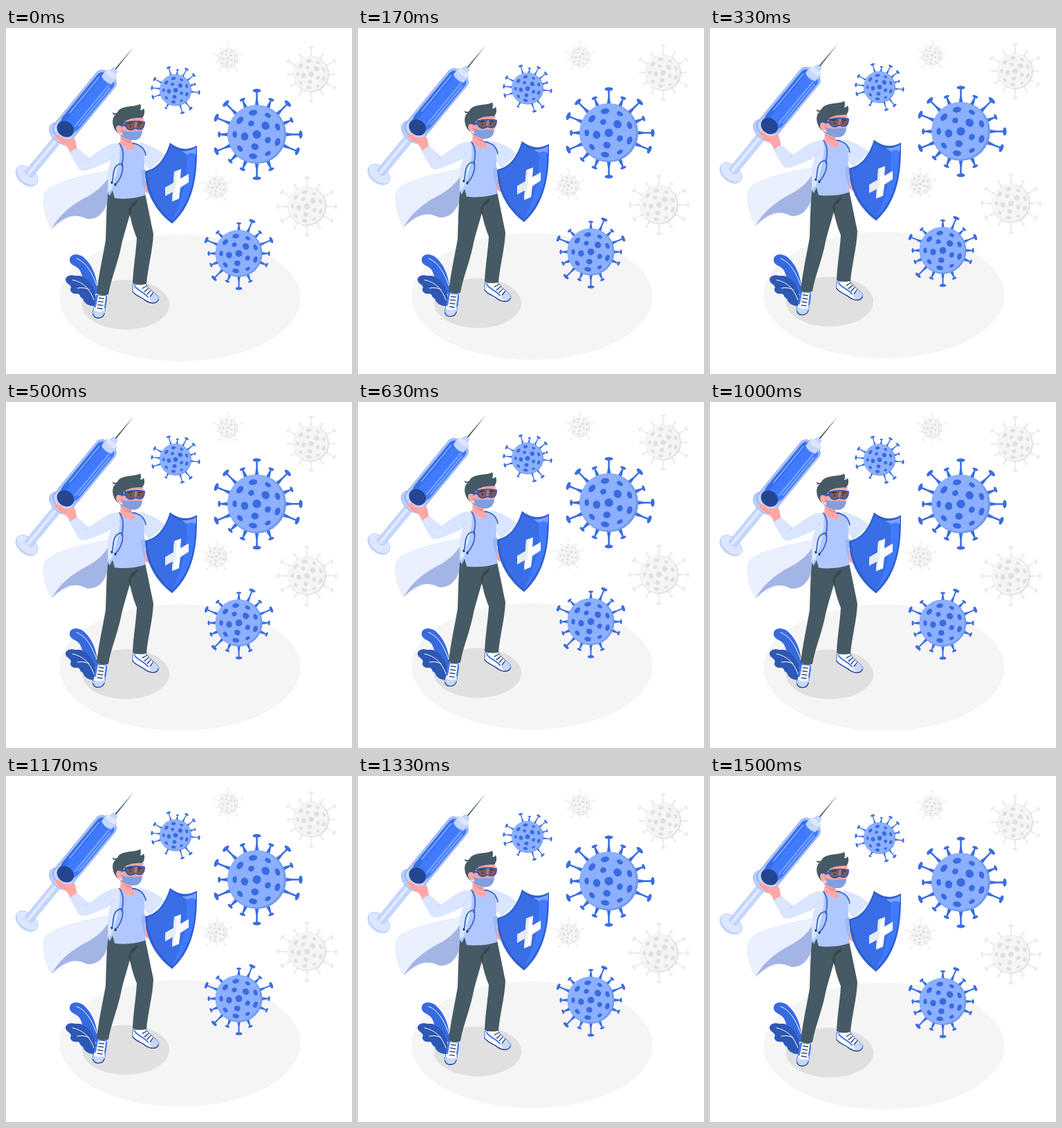
An HTML page that plays this animation: 500x500 px, repeating every 1.54 s.

```html
<!DOCTYPE html>
<html lang="en">
<head>
<meta charset="utf-8">
<title>Shielded against the virus</title>
<style>
html, body { margin: 0; width: 100%; height: 100%; overflow: hidden; background: #fff; }
svg { display: block; width: 100vw; height: 100vh; }
.line { fill: none; stroke-linecap: round; stroke-linejoin: round; }
.laces { fill: none; stroke: #324a76; stroke-width: 8; stroke-dasharray: 1.5 3.5; }
</style>
</head>
<body>
<svg viewBox="0 0 500 500">
<g class="float">
  <ellipse cx="251.5" cy="390.5" rx="174" ry="91.5" fill="#f5f5f5"/>
  <ellipse cx="173" cy="400" rx="63" ry="36" fill="#e0e0e0"/>
  <g id="viruses"></g>
</g>

<g id="leaves">
  <path fill="#376ade" d="M133 384C132 361 126 344 113 332C105 325 93 326 92 334C91 342 100 343 105 348C110 353 108 358 114 363C121 368 121 378 128 384Z"/>
  <path fill="#2d58b5" d="M130 402C131 384 126 370 115 362C110 357 104 358 100 358C94 356 86 358 86 364C87 370 94 371 94 375C91 380 96 385 102 384C108 383 106 390 111 391C113 399 121 402 130 402Z"/>
  <path class="line" stroke="#fff" d="M102 333C115 338 124 352 131 372M96 364C112 367 122 378 127 393M103 376Q112 374 120 378"/>
</g>

<g class="float">
  <g id="cape">
    <path fill="#ebf0ff" stroke="#d3dffc" stroke-width=".6" d="M148 206C120 212 82 219 62 232C54 237 53 247 55 259C57 272 61 282 66 290C82 277 98 267 117 271C135 274 146 262 150 247L162 205Z"/>
    <path fill="#a3b5e5" d="M66 290C76 272 90 260 108 249C126 240 142 230 151 210L160 214L148 247C144 264 134 278 117 276C96 266 83 274 66 290Z"/>
  </g>

  <g id="shoes">
    <path fill="#fff" stroke="#3567d6" d="M131 386L145 387C146 397 143 403 143 409C142 416 138 419 133 419C126 419 124 414 126 408C129 400 129 393 131 386Z"/>
    <path fill="#c7d8ff" d="M127 407C131 411 138 411 143 408C143 416 138 419 133 418C126 418 124 413 127 407Z"/>
    <path class="line" stroke="#29448c" stroke-width="1.3" d="M126 414C128 421 140 421 142 413"/>
    <path class="laces" d="M138 390L135.5 407"/>
    <path class="line" stroke="#3f79f7" stroke-width="2" d="M132 387L129 403M145 389L143 404"/>
    <path fill="#fff" stroke="#3567d6" d="M183 371L202 369C205 378 219 384 221 391C220 399 209 399 201 394C194 388 187 386 183 381Z"/>
    <path fill="#c7d8ff" d="M207 393C207 387 212 385 215 384C220 388 222 391 219 395C216 398 211 397 207 393Z"/>
    <path class="line" stroke="#29448c" stroke-width="1.3" d="M183 381C189 389 197 389 202 394C209 399 218 399 220 393"/>
    <path class="laces" d="M200 374Q203 380 211 386"/>
    <path class="line" stroke="#3f79f7" stroke-width="2" d="M186 373C190 380 199 381 205 389"/>
  </g>

  <g id="trousers">
    <path fill="#455a64" d="M148 235L200 234C204 254 209 278 213 298C212 322 205 346 203 370Q193 373 183 369C184 345 188 324 189 304C185 294 181 281 179 270C174 288 169 303 166 318C161 342 152 362 148 385Q140 388 131 384C134 356 140 331 144 307C145 282 145 255 148 235Z"/>
    <path fill="#37474f" d="M177 265C178 257 183 252 191 248C189 256 184 258 181 261L180 274Z"/>
  </g>

  <g id="torso">
    <path fill="#dae5ff" d="M192 165C206 168 219 175 230 184L207 206L198 193Z"/>
    <path fill="#ffa8a7" d="M198 221L208 221V240Q199 238 198 230Z"/>
    <path fill="#b1c8ff" d="M160 168L171 164L188 166L199 177C201 196 199 219 201 242Q179 249 157 246L154 235L150 243L146 237C153 216 157 190 160 168Z"/>
    <path fill="#9fb8f2" d="M201 204L195 206Q195 220 201 236Z"/>
    <path fill="#dae5ff" d="M154 168L164 166C167 190 159 215 153 233L147 238C148 220 145 208 151 193Z"/>
    <path fill="#ffa8a7" d="M166 153L181 161L182 166C187 170 187 175 184 177C176 176 168 172 165 167Z"/>
    <path fill="#f28f8f" d="M167 158Q174 164 181 163L181 167Q172 166 167 158Z"/>
    <path class="line" stroke="#3664c8" stroke-width="1.8" d="M164 167C171 176 170 190 167 199M183 167C194 168 200 174 202 184M167 196C155 197 155 211 154 221M168 196C171 208 163 222 158 226"/>
    <path class="line" stroke="#263b65" stroke-width="3" d="M153 223V224M158 226V227"/>
  </g>

  <g id="head">
    <path fill="#ffa8a7" d="M165 134L198 128C200 144 197 158 188 162C177 164 169 158 167 152C160 154 157 145 160 140Z"/>
    <path fill="#455a64" d="M163 153C157 150 152 138 155 130Q156 127 159 125Q154 127 154 122Q158 125 161 122C165 114 176 114 183 113Q191 112 194 110Q196 114 194 119Q198 119 199 116Q202 124 197 130C190 130 183 130 176 133C171 135 169 139 168 144Q165 139 160 142Q157 147 163 153Z"/>
    <path fill="#7f9fe0" d="M168 148C177 152 189 148 197 150C196 156 194 160 188 162C180 163 172 161 169 157Z"/>
    <path class="line" stroke="#5d86df" d="M166 147L169 150M170 157Q165 157 164 153"/>
    <path class="line" stroke="#2c56b5" stroke-width="2.5" d="M164 140L172 141"/>
    <path fill="#7c5c62" stroke="#2c56b5" stroke-width="1.8" d="M172 137Q185 133 200 136C200 144 197 148 190 146Q187 144 185 146C179 149 173 147 172 137Z"/>
    <path class="line" stroke="#ae7f7d" stroke-width="3" d="M188 137L187 143"/>
    <path class="line" stroke="#263238" stroke-width="1.4" d="M176 138L182 137M191 137L196 138M180 141V143M192 140V142"/>
  </g>

  <g id="syringe" transform="translate(185 27) rotate(39.4)">
    <path fill="#455a64" d="M0 0L1.1 44H-1.1Z"/>
    <ellipse cx="-1" cy="244" rx="18" ry="11.5" fill="#c5d6ff"/>
    <ellipse cx="-1" cy="242" rx="18" ry="11" fill="#dce7ff" stroke="#a9c1f7" stroke-width=".7"/>
    <path fill="#c5d6ff" stroke="#a2bbef" stroke-width=".6" d="M-7 165V239Q0 244 6 239V165Z"/>
    <path fill="#e2ebff" d="M-3 165V241H1V165Z"/>
    <ellipse cx="-1" cy="164" rx="20" ry="13" fill="#bacfff" stroke="#86a6ed" stroke-width=".7"/>
    <path fill="#a6c1ff" stroke="#7298ed" stroke-width=".7" d="M-18 62Q-17 53 -1 52Q15 53 16 62V160Q14 171 -1 171Q-17 171 -18 160Z"/>
    <path fill="#407bff" d="M-15 64Q-14 56 -1 56Q13 56 14 64V153Q11 163 -1 163Q-13 163 -15 153Z"/>
    <path fill="#376ee9" d="M-15 64Q-14 57 -8 56V159Q-14 157 -15 153Z"/>
    <path fill="#d9e4ff" opacity=".65" d="M-16 143Q-11 161 -1 164Q10 162 14 143V161Q10 170 -1 170Q-14 169 -16 161Z"/>
    <ellipse cx="-1" cy="155" rx="13" ry="11" fill="#244690"/>
    <path class="line" stroke="#83a9ff" stroke-width="1.8" d="M7 66V143M11 68V139M-11 66V133"/>
    <path fill="#c5d6ff" stroke="#95b2f4" stroke-width=".6" d="M-4 43Q0 41 4 43L5 49Q10 50 10 54L9 63Q0 67 -9 63L-10 54Q-10 50 -5 49Z"/>
    <ellipse cy="52" rx="9" ry="4" fill="#dce7ff"/>
  </g>

  <g id="raised-arm">
    <path fill="#ffa8a7" d="M70 155Q76 152 82 159Q90 162 98 159C102 164 101 170 103 176L93 182C91 174 87 170 82 168Q73 163 70 155Z"/>
    <path class="line" stroke="#ed8d8d" stroke-width=".7" d="M73 157L83 163M78 163L86 166"/>
    <path fill="#dae5ff" d="M92 181Q97 175 104 174C109 178 114 183 120 188C132 180 145 168 157 167Q165 171 160 181C151 194 132 201 116 206Q107 208 104 202Z"/>
    <path class="line" stroke="#b9cbf4" stroke-width=".7" d="M120 188L114 192M158 181Q153 190 144 195"/>
  </g>

  <g id="shield">
    <path fill="#2f60d0" d="M237 166C251 177 264 177 276 170C276 202 276 251 240 283C211 261 201 232 201 207C219 204 230 188 237 166Z"/>
    <path fill="#3a6ee6" d="M238 170C250 180 262 181 273 175C274 207 271 249 240 279C215 258 205 232 204 209C221 205 232 189 238 170Z"/>
    <path fill="#407bff" d="M261 180Q267 179 273 175C274 207 271 249 240 279C255 250 264 214 261 180Z"/>
    <path fill="#7ca4ff" d="M254 178Q265 179 275 173L274 184Q270 178 262 183Q258 181 254 178Z"/>
    <path fill="#fff" d="M243 208L253 204L252 218L264 211V223L252 231L250 247L240 251L241 237L230 243V231L242 224Z"/>
    <path fill="#e8ebf2" d="M243 208L247 206L245 231L240 251L241 237L230 243V231L242 224Z"/>
  </g>
</g>
</svg>
<script>
const NS = 'http://www.w3.org/2000/svg';
const layer = document.getElementById('viruses');

function add(parent, tag, attrs) {
  const el = document.createElementNS(NS, tag);
  for (const k in attrs) el.setAttribute(k, attrs[k]);
  return parent.appendChild(el);
}

const blue = { body: '#8cb0ff', shade: '#7299ee', spot: '#396be0', spike: '#396de2' };
const grey = { body: '#f5f5f5', shade: '#e0e0e0', spot: '#e0e0e0', spike: '#ebebeb' };

// Unit radius; local x points outwards.
function spike(g, angle, reach, fill) {
  const s = add(g, 'g', { transform: `rotate(${angle})`, fill });
  const cap = reach > 1.4 ? 0.14 : 0.1;
  add(s, 'path', { d: `M.95-.07L1.2-.03H${reach}V.03H1.2L.95 .07Z` });
  add(s, 'ellipse', { cx: reach, rx: cap * 0.45, ry: cap });
}

// Spots flatten towards the rim, as on a ball.
function ring(g, count, radius, from, fill) {
  for (let i = 0; i < count; i++) {
    const angle = from + i * 360 / count;
    const size = 0.125 + 0.02 * Math.cos(i * 2.4);
    add(g, 'ellipse', {
      cx: radius, rx: size * Math.sqrt(1 - radius * radius), ry: size,
      fill, transform: `rotate(${angle})`
    });
  }
}

// Spikes stand at even angles, clockwise from `turn`: L long, s short, - none.
function virus(x, y, r, tone, spikes, turn = -90) {
  const g = add(layer, 'g', { transform: `translate(${x} ${y}) scale(${r})` });
  [...spikes].forEach((kind, i) => {
    if (kind !== '-') spike(g, turn + i * 360 / spikes.length, kind === 'L' ? 1.49 : 1.28, tone.spike);
  });
  add(g, 'circle', { r: 1, fill: tone.shade });
  add(g, 'ellipse', { cx: -0.035, cy: -0.025, rx: 0.96, ry: 0.97, fill: tone.body });
  ring(g, 1, 0, 0, tone.spot);
  ring(g, 5, 0.42, -45, tone.spot);
  ring(g, 9, 0.75, -100, tone.spot);
}

virus(320.5, 44, 14.5, grey, 'LsLsLsLsLs');
virus(441, 67, 26, grey, 'LsLsLsLsssLs');
virus(435, 258, 28, grey, 'LsLLLsLsLLLs');
virus(304, 230, 15, grey, 'LsLsLsLsLs');
virus(245, 90, 23, blue, 'LsLLsL-LL-s-LLL-', -107);
virus(362.5, 154, 42.5, blue, 'LsLsLL-sLssLsLLs');
virus(336.5, 326, 34, blue, 'sLsLss-sLsLssLs-');

// Linear float of 10px with a 1.5s period, cut to the 1.54s loop; the leaves stay put.
const LOOP = 1540, PERIOD = 1500, LEAD = 10, LIFT = 10;
const floats = document.querySelectorAll('.float');
const start = performance.now();

function draw() {
  const t = (performance.now() - start) % LOOP;
  const phase = ((t + LEAD) % PERIOD) / PERIOD;
  const y = -LIFT * (1 - Math.abs(1 - 2 * phase));
  for (const el of floats) el.setAttribute('transform', `translate(0 ${y.toFixed(3)})`);
  requestAnimationFrame(draw);
}
draw();
</script>
</body>
</html>
```
